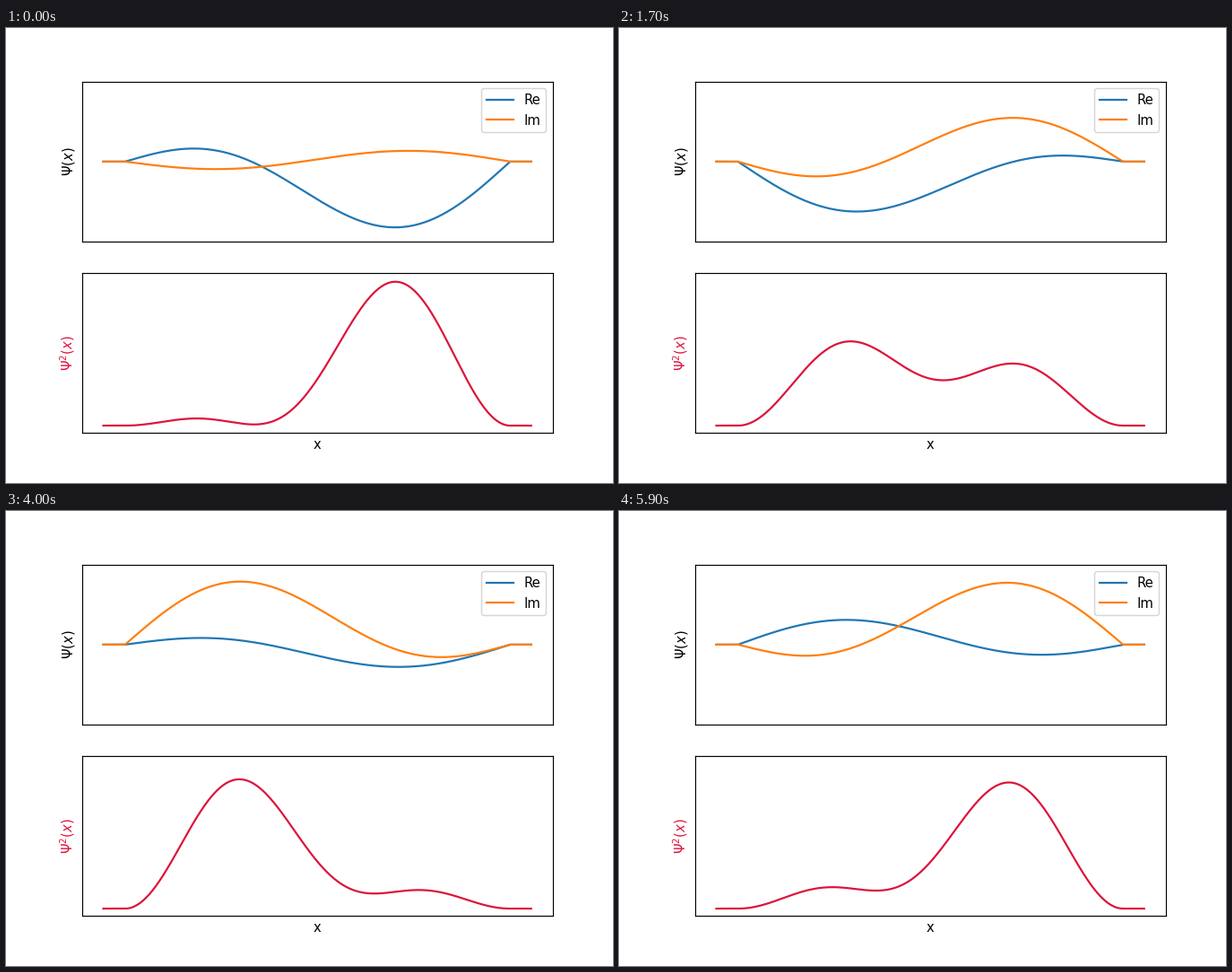
Recreate the animation shown at these times as a matplotlib script. Size 677x507 px, loop 6000 ms.

```python
import numpy as np
import matplotlib.pyplot as plt
from matplotlib.animation import FuncAnimation

W, H, DPI = 677, 507, 105.83
FRAMES, INTERVAL = 60, 100

# Superposition of the two lowest states of an infinite well: E2 = 4 * E1
STEP = np.radians(1.735)
FIRST_STEP = 2
WELL_LEFT, WELL_WIDTH = 0.0508, 0.9

x = np.linspace(0, 1, 1000)
u = np.clip((x - WELL_LEFT) / WELL_WIDTH, 0, 1)
state_1 = -np.sin(np.pi * u)
state_2 = np.sin(2 * np.pi * u)


def psi(frame):
    phase = STEP * (frame + FIRST_STEP)
    return state_1 * np.exp(-1j * phase) + state_2 * np.exp(-4j * phase)


plt.rcParams["font.family"] = "DejaVu Sans"
# The tiny margin keeps the pixel size from being truncated by rounding
size = ((W + 1e-6) / DPI, (H + 1e-6) / DPI)
fig, (ax_psi, ax_density) = plt.subplots(2, 1, figsize=size, dpi=DPI)

# Layout of a 6.4 x 4.8 inch page, cropped to whole pixels
kx, ky = 6.4 * DPI / W, 4.8 * DPI / H
fig.subplots_adjust(left=0.125 * kx, right=0.9 * kx,
                    bottom=0.11 * ky, top=0.88 * ky, hspace=0.2)

start = psi(0)
re_line, = ax_psi.plot(x, start.real, color="tab:blue", label="Re")
im_line, = ax_psi.plot(x, start.imag, color="tab:orange", label="Im")
density_line, = ax_density.plot(x, np.abs(start) ** 2, color="crimson")

peak = np.max((state_1 - state_2) ** 2)
ax_psi.set_ylim(-2.1, 2.1)
ax_density.set_ylim(-0.05 * peak, 1.05 * peak)
for ax in (ax_psi, ax_density):
    ax.set_xlim(-0.05, 1.05)
    ax.set_xticks([])
    ax.set_yticks([])

ax_psi.set_ylabel(r"$\Psi(x)$")
ax_density.set_ylabel(r"$\Psi^2(x)$", color="crimson")
ax_density.set_xlabel("x")
ax_psi.legend(loc="upper right")


def update(frame):
    wave = psi(frame)
    re_line.set_ydata(wave.real)
    im_line.set_ydata(wave.imag)
    density_line.set_ydata(np.abs(wave) ** 2)
    return re_line, im_line, density_line


anim = FuncAnimation(fig, update, frames=FRAMES, interval=INTERVAL,
                     repeat=True, repeat_delay=0, blit=False)
plt.show()
```
